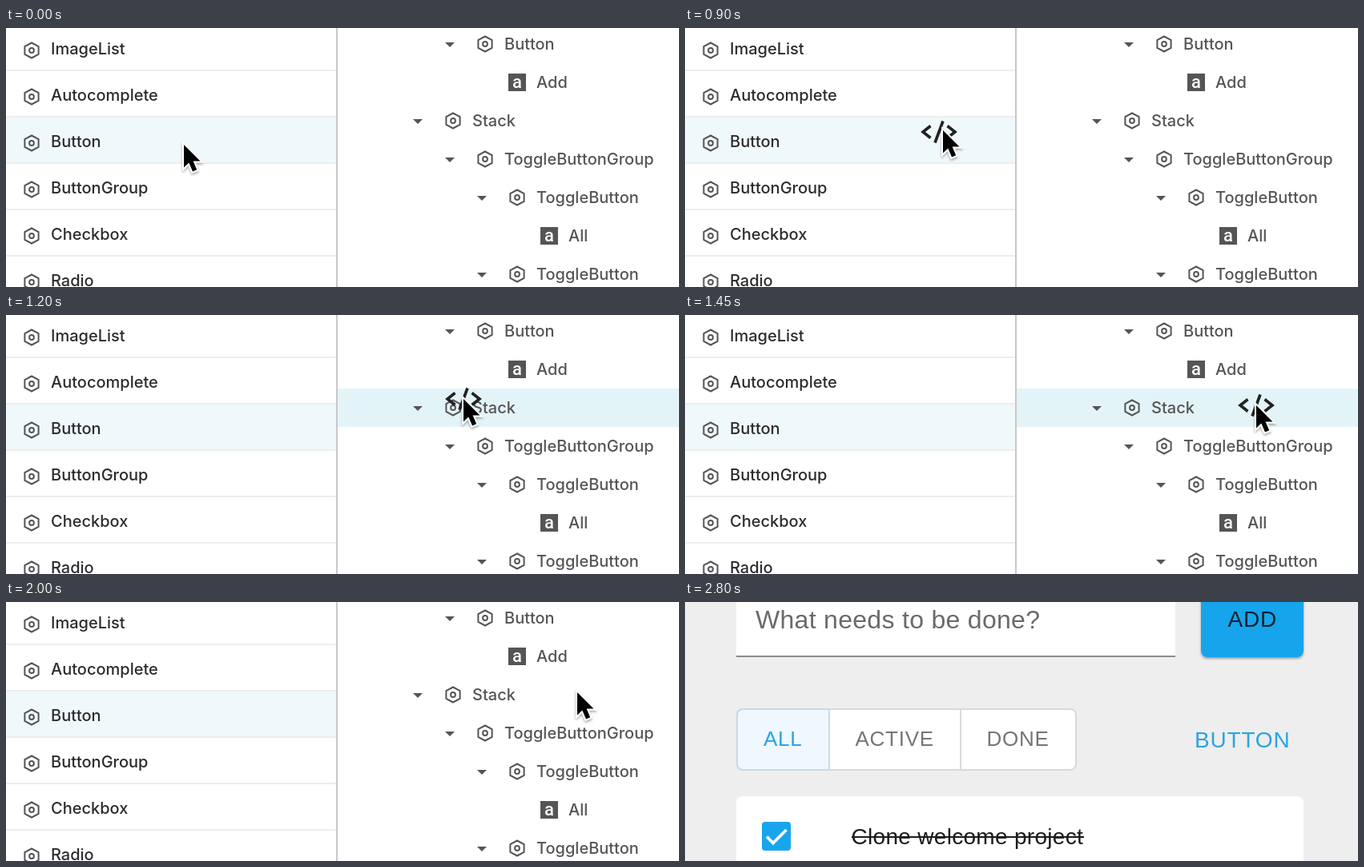
Write an HTML page that moves like this. It is 840 by 324 pixels and loops after 4610 ms.

```html
<!DOCTYPE html>
<html lang="en">
<head>
<meta charset="utf-8">
<title>Drag a component into the tree</title>
<style>
html, body { margin: 0; width: 100%; height: 100%; overflow: hidden; background: #fff; }
svg { display: block; }
.list { font: 500 20px Inter, sans-serif; }
.app { font: 28px "Liberation Sans", Arial, sans-serif; }
</style>
</head>
<body>
<svg width="840" height="324" viewBox="0 0 840 324">
  <defs>
    <g id="hex" fill="none" stroke="#555" stroke-width="2">
      <path d="M0-9.5 8.6-4.8V4.8L0 9.5-8.6 4.8V-4.8Z"/>
      <circle r="2.9"/>
    </g>
    <path id="caret" d="M-6-2H6L0 4Z" fill="#555"/>
    <g id="label">
      <rect x="-11" y="-11" width="22" height="22" fill="#555"/>
      <text y="6.5" text-anchor="middle" fill="#fff" style="font:500 22px Roboto,sans-serif">a</text>
    </g>
    <filter id="soft" x="-50%" y="-50%" width="200%" height="200%">
      <feDropShadow dx="0" dy="2" stdDeviation="1.5" flood-opacity=".35"/>
    </filter>
  </defs>

  <g id="editor" class="list">
    <rect width="840" height="324" fill="#fff"/>
    <rect y="111" width="412" height="57" fill="#eff8fb"/>
    <rect id="target" x="414" y="92" width="426" height="48" fill="#e3f4f9"/>
    <g id="rows" fill="#2c2c2c"></g>
    <rect x="412" width="2" height="324" fill="#c8c8c8"/>
    <g id="tree" fill="#555"></g>
    <path id="code" d="M-10.5-7.5-20 0-10.5 7.5M10.5-7.5 20 0 10.5 7.5M5-13.5-5 13.5"
      fill="none" stroke="#222" stroke-width="3.6"/>
    <path id="cursor" d="M0 0V28.5L6.3 22.5 11 33.5 16.2 31.3 11.6 20.6H20.5Z"
      stroke="#fff" stroke-width="4" paint-order="stroke" filter="url(#soft)"/>
  </g>

  <g id="app" class="app">
    <rect width="840" height="324" fill="#eee"/>
    <rect x="64" width="548" height="68" fill="#fff"/>
    <rect x="64" y="67" width="548" height="2" fill="#8c8c8c"/>
    <text x="88" y="33" fill="#6a6a6a" font-size="32" letter-spacing=".3">What needs to be done?</text>
    <rect x="644" y="-10" width="128" height="79" rx="8" fill="#19a5ec" filter="url(#soft)"/>
    <text x="677.5" y="31" fill="#10202c" letter-spacing=".8">ADD</text>

    <rect x="65" y="134" width="423" height="76" rx="7" fill="#fff"/>
    <path d="M180 134H72a7 7 0 0 0-7 7v62a7 7 0 0 0 7 7h108Z" fill="#eff8fe"/>
    <rect x="65" y="134" width="423" height="76" rx="7" fill="none" stroke="#dadada" stroke-width="2"/>
    <path d="M344 134V210" stroke="#dadada" stroke-width="2"/>
    <path d="M180 134H72a7 7 0 0 0-7 7v62a7 7 0 0 0 7 7h108Z" fill="none" stroke="#c9dae4" stroke-width="2"/>
    <g font-size="26" letter-spacing=".74" fill="#757575">
      <text x="98" y="180" fill="#2ba3e3">ALL</text>
      <text x="212.5" y="180">ACTIVE</text>
      <text x="376.5" y="180">DONE</text>
    </g>
    <text id="added" x="636" y="182" fill="#2ba3e3" letter-spacing=".8">BUTTON</text>

    <rect x="64" y="243" width="708" height="90" rx="8" fill="#fff"/>
    <rect x="96" y="275" width="36" height="36" rx="4" fill="#19a5ec"/>
    <path d="M102 293.5 110 301.5 126.5 285" fill="none" stroke="#fff" stroke-width="3.8"/>
    <text x="207.5" y="303" fill="#1c1c1c" letter-spacing=".3">Clone welcome project</text>
    <rect x="208" y="293" width="290" height="2" fill="#1c1c1c"/>
  </g>
</svg>
<script>
const $ = id => document.getElementById(id);
const use = (id, x, y) => `<use href="#${id}" x="${x}" y="${y}"/>`;
const text = (s, x, y) => `<text x="${x}" y="${y}">${s}</text>`;

$('rows').innerHTML = ['ImageList', 'Autocomplete', 'Button', 'ButtonGroup', 'Checkbox', 'Radio']
  .map((name, i) => {
    const y = 28 + 58 * i;
    return `<rect y="${y + 24}" width="412" height="2" fill="#eee"/>` +
      use('hex', 32, y) + text(name, 56, y + 5);
  }).join('');

// [name, indent level, is a text leaf]
$('tree').innerHTML = [
  ['Button', 1], ['Add', 2, true], ['Stack', 0], ['ToggleButtonGroup', 1],
  ['ToggleButton', 2], ['All', 3, true], ['ToggleButton', 2]
].map(([name, level, leaf], i) => {
  const x = 558 + 40 * level, y = 20 + 48 * i;
  return (leaf ? use('label', x, y) : use('caret', x - 44, y) + use('hex', x, y)) +
    text(name, x + 24, y + 7);
}).join('');

// Cursor path: time, x, y, speed x, speed y
const path = [
  [650, 222, 146, 0, 0],
  [900, 322, 128, .68, -.07],
  [1200, 571, 105, .85, -.13],
  [1450, 713, 113, 0, 0]
];

function cursorAt(t) {
  t = Math.min(Math.max(t, 650), 1450);
  const i = Math.max(1, path.findIndex(p => p[0] >= t));
  const a = path[i - 1], b = path[i], d = b[0] - a[0], u = (t - a[0]) / d;
  const mix = k => a[k] + (b[k] - a[k]) * u * u * (3 - 2 * u) +
    d * u * (1 - u) * (a[k + 2] * (1 - u) - b[k + 2] * u);
  return [mix(1), mix(2)];
}

const show = (id, on) => $(id).style.display = on ? '' : 'none';
const clamp = v => Math.min(1, Math.max(0, v));
const move = (id, x, y) => $(id).setAttribute('transform', `translate(${x} ${y})`);

function frame(now) {
  const t = Math.floor(now % 4610 / 50) * 50;
  const [x, y] = cursorAt(t);
  const dragging = t >= 700 && t < 1750;
  const lag = 1 - clamp((t - 900) / 300);
  show('editor', t < 2300);
  show('app', t >= 2300);
  show('code', dragging);
  show('target', dragging && x > 414);
  move('cursor', x, y);
  move('code', x - 5 * lag, y + 2 * lag);
  $('added').style.opacity = clamp((t - 2650) / 150);
  requestAnimationFrame(frame);
}
requestAnimationFrame(frame);
</script>
</body>
</html>
```
